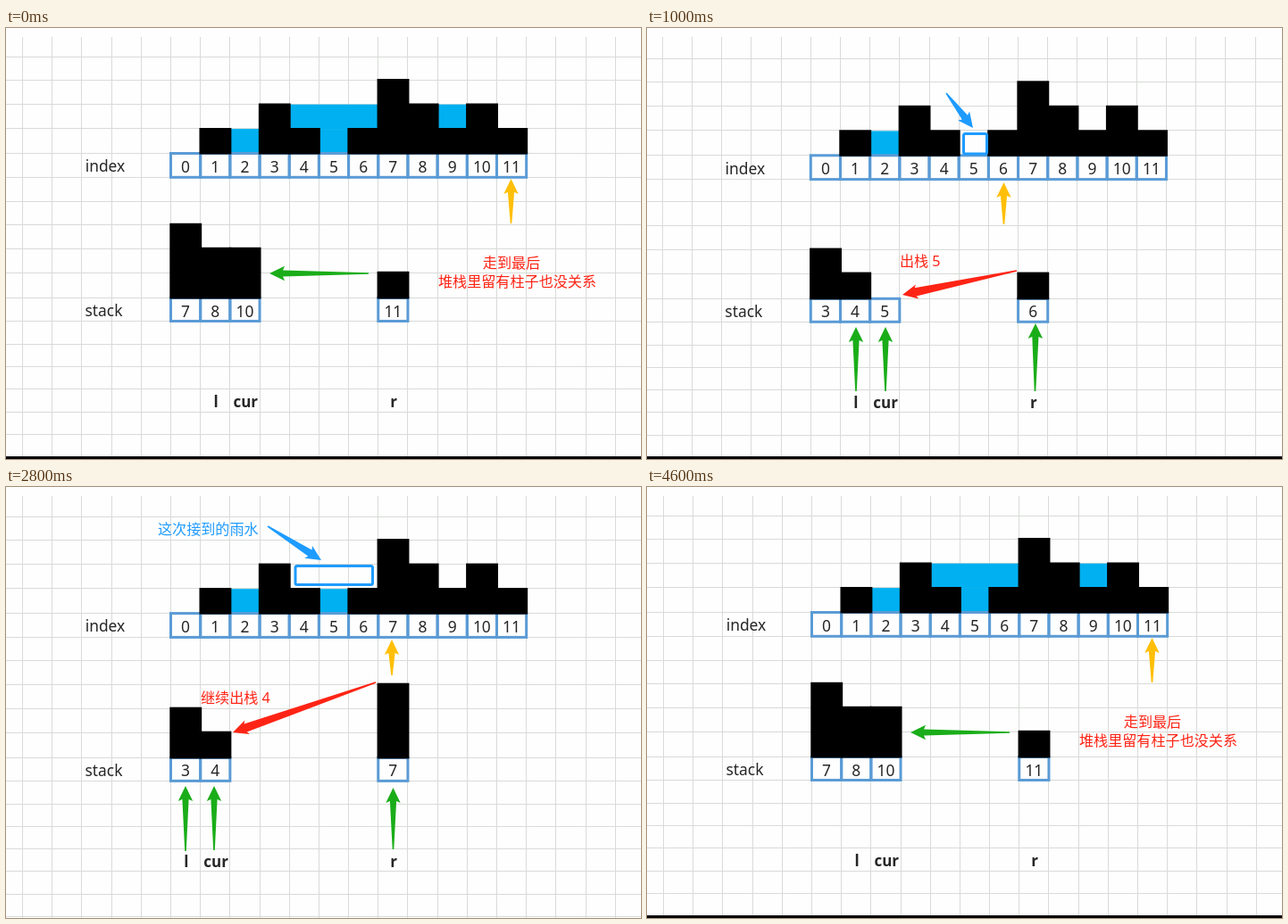
An HTML page that plays this animation: 711x483 px, repeating every 5000 ms.

```html
<!DOCTYPE html>
<html lang="zh-CN">
<head>
<meta charset="utf-8">
<title>Rain water stack</title>
<style>
html, body { margin: 0; width: 100%; height: 100%; overflow: hidden; background: #fefefe; }
svg { display: block; width: 711px; height: 483px; }
text { font-family: "Noto Sans", "Noto Sans CJK SC", sans-serif; white-space: pre; }
</style>
</head>
<body>
<svg id="stage" viewBox="0 0 711 483"></svg>
<script>
const RED = '#fe2415', BLUE = '#1e9bff', GREEN = '#1aad19', GOLD = '#ffbf08';
const INK = '#262626', CELL = '#5b9bd5', WATER = '#00b0f0';
const COL = 33.18;
const heights = [0, 1, 0, 2, 1, 0, 1, 3, 2, 1, 2, 1];

const rect = (x, y, w, h, fill) =>
  `<rect x="${x}" y="${y}" width="${w}" height="${h}" fill="${fill}"/>`;
const frame = (x, y, w, h, color, r = 0) =>
  `<rect x="${x}" y="${y}" width="${w}" height="${h}" rx="${r}" fill="none" stroke="${color}" stroke-width="3"/>`;
const text = (x, y, str, color = INK, size = 17.4, extra = '') =>
  `<text x="${x}" y="${y}" fill="${color}" font-size="${size}" ${extra}>${str}</text>`;
const mid = 'text-anchor="middle"';
const note = (x, y, str, color = RED, size = 16.1, extra) => text(x, y, str, color, size, extra);

// Tapered arrow: thin tail, widening shaft, swept head.
function arrow(color, x1, y1, x2, y2, thick = 3.6) {
  const len = Math.hypot(x2 - x1, y2 - y1);
  const ux = (x2 - x1) / len, uy = (y2 - y1) / len;
  const outline = [[0, 0.8], [len - 15, thick], [len - 17, 8.2], [len, 0],
                   [len - 17, -8.2], [len - 15, -thick], [0, -0.8]];
  const pts = outline.map(([a, b]) =>
    (x1 + ux * a - uy * b).toFixed(1) + ',' + (y1 + uy * a + ux * b).toFixed(1));
  return `<polygon points="${pts.join(' ')}" fill="${color}"/>`;
}
const green = (...p) => arrow(GREEN, ...p);
const red = (...p) => arrow(RED, ...p, 4.8);
const blue = (...p) => arrow(BLUE, ...p, 4);
const gold = (...p) => arrow(GOLD, ...p);

// x: left edge of cell 0, top/base: upper edges of the two cell rows,
// water: [column, level, span], stack: indices, l: column of the "l" label
const scenes = [
  { at: 0, x: 184.5, top: 140.5, base: 302.5, floor: 480, l: 1,
    water: [[2, 1, 1], [4, 2, 3], [5, 1, 1], [9, 2, 1]], stack: [7, 8, 10], next: 11,
    extra: gold(565.5, 219, 565.5, 169) + green(406, 275, 295, 275) +
      note(566, 269, '走到最后', RED, 16.1, mid) +
      note(572.5, 290, '堆栈里留有柱子也没关系', RED, 16.1, mid) },
  { at: 100, x: 186.7, top: 142.5, base: 302, floor: 481, l: 0,
    water: [], stack: [1, 2], next: 3,
    extra: blue(231, 69, 264, 110) + frame(258, 117, 24, 22.5, BLUE, 2) +
      gold(303, 221, 303, 172) + red(418, 246, 257, 299) +
      green(202.5, 405, 203, 333) + green(238.5, 405, 239, 333) + green(435.5, 405, 435.5, 333) +
      note(525, 267, 'w = (3 - 1 - 1) = 1', BLUE, 17, 'word-spacing="2.3"') +
      note(572, 293, '×', BLUE, 15, mid) +
      note(527, 321, 'h = min(1, 2)\u00a0 - 0 = 1', BLUE, 17, 'word-spacing="0.6"') },
  { at: 1000, x: 183.3, top: 142.8, base: 303.3, floor: 480, l: 1,
    water: [[2, 1, 1]], stack: [3, 4, 5], next: 6,
    extra: blue(335, 73, 365, 112) + frame(354.5, 118.5, 26, 22.5, BLUE, 2) +
      gold(399.5, 220, 399.5, 173) + red(414, 272, 286, 299) +
      green(234, 407, 234, 335) + green(267, 407, 267, 335) + green(434.5, 407, 435, 331) +
      note(283, 267, '出栈 5') },
  { at: 1900, x: 184.8, top: 143.3, base: 304.7, floor: 482, l: 1, lid: true,
    water: [[2, 1, 1], [5, 1, 1]], stack: [3, 4, 6], next: 7,
    extra: frame(214.5, 240, 73.5, 97, RED, 2) +
      red(119, 226, 209, 239) + red(416, 223, 289, 274) +
      green(235, 408, 235, 334) + green(269, 408, 269, 335) + green(433, 408, 433, 333) +
      note(6, 214, 'cur 和 l 相等，') + note(114, 214, '高度差是 0 。') +
      note(211.5, 214, '这次没有接到雨水，') + note(356.5, 214, '但是不要怕，') +
      note(453, 214, '6 出栈完还有 4') },
  { at: 2800, x: 184.5, top: 141.6, base: 303.4, floor: 483, l: 0,
    water: [[2, 1, 1], [5, 1, 1]], stack: [3, 4], next: 7,
    extra: blue(293, 44, 353, 82) + frame(324, 88.5, 86.5, 21, BLUE, 2) +
      gold(432, 211, 432, 171) + red(414, 219, 254, 275) +
      green(201, 408, 201, 335) + green(233, 407, 233, 335) + green(433.5, 406, 433.5, 337) +
      note(170, 53, '这次接到的雨水', BLUE) + note(218, 242, '继续出栈 4') },
  { at: 3700, x: 185.6, top: 142.5, base: 304.2, floor: 483, l: 1,
    water: [[2, 1, 1], [4, 2, 3], [5, 1, 1]], stack: [7, 8, 9], next: 10,
    extra: blue(526, 41, 501, 86) + frame(487.5, 90.5, 25.5, 20, BLUE, 2) +
      gold(534.5, 219, 534.5, 172) + red(414, 247, 287, 274) +
      green(235, 409, 235, 334) + green(268, 408, 268, 334) + green(432.5, 407, 432.5, 331) +
      note(551, 376, '无需多言') }
];

function grid(s) {
  const rows = [-108.5, -82.5, -55.5, -28, 0, 26.5].map(d => s.top + d)
    .concat([-108.5, -82, -55, -28, 0, 26, 52, 77, 102, 127.5, 153, 178].map(d => s.base + d));
  if (s.lid) rows.push(10.5);
  let d = '';
  for (const y of rows) d += `M0 ${Math.floor(y) + 0.5}H711`;
  for (let k = -5; k < 16; k++) d += `M${Math.floor(s.x + k * COL) + 0.5} 10V483`;
  return `<path d="${d}" stroke="#d8dbd8" fill="none"/>`;
}

function draw(s) {
  const cx = k => s.x + k * COL;
  const bar = (k, y, h) => rect(cx(k) - 1.2, y - h, COL + 2.7, h + 1, '#000');
  const cell = (k, y, label, h) =>
    frame(cx(k), y, COL, h, CELL) +
    text(cx(k) + COL / 2, y + 21, label, INK, 17.4, mid);
  const tag = (k, str) =>
    text(cx(k) + COL / 2 + 0.8, s.base + 122.8, str, INK, 17, mid + ' font-weight="700"');

  let out = rect(0, 0, 711, 483, '#fefefe') + grid(s);
  for (const [k, level, span] of s.water)
    out += rect(cx(k) + 1, s.top - 27.4 * level, COL * span, 27.8, WATER);

  heights.forEach((h, k) => { out += cell(k, s.top, k, 26.8); });
  heights.forEach((h, k) => { if (h) out += bar(k, s.top, 27.5 * h + 1); });

  const held = s.stack.map((v, k) => [k, v]).concat([[7, s.next]]);
  for (const [k, v] of held) out += cell(k, s.base, v, 26);
  for (const [k, v] of held)
    if (heights[v]) out += bar(k, s.base, 27 * heights[v] + 2.7);

  out += text(s.x - 95.8, s.top + 20.8, 'index') + text(s.x - 96, s.base + 20.2, 'stack');
  out += tag(s.l, 'l') + tag(s.l + 1, 'cur') + tag(7, 'r');
  return out + s.extra + rect(0, s.floor, 711, 483 - s.floor, '#000');
}

const stage = document.getElementById('stage');
let shown = -1;

function render(ms) {
  const t = ms % 5000;
  // The last stretch of the loop shows the opening scene again.
  const i = t >= 4600 ? 0 : scenes.filter(s => s.at <= t).length - 1;
  if (i === shown) return;
  shown = i;
  stage.innerHTML = draw(scenes[i]);
}

const start = performance.now();
function tick() {
  render(performance.now() - start);
  requestAnimationFrame(tick);
}
tick();
</script>
</body>
</html>
```
